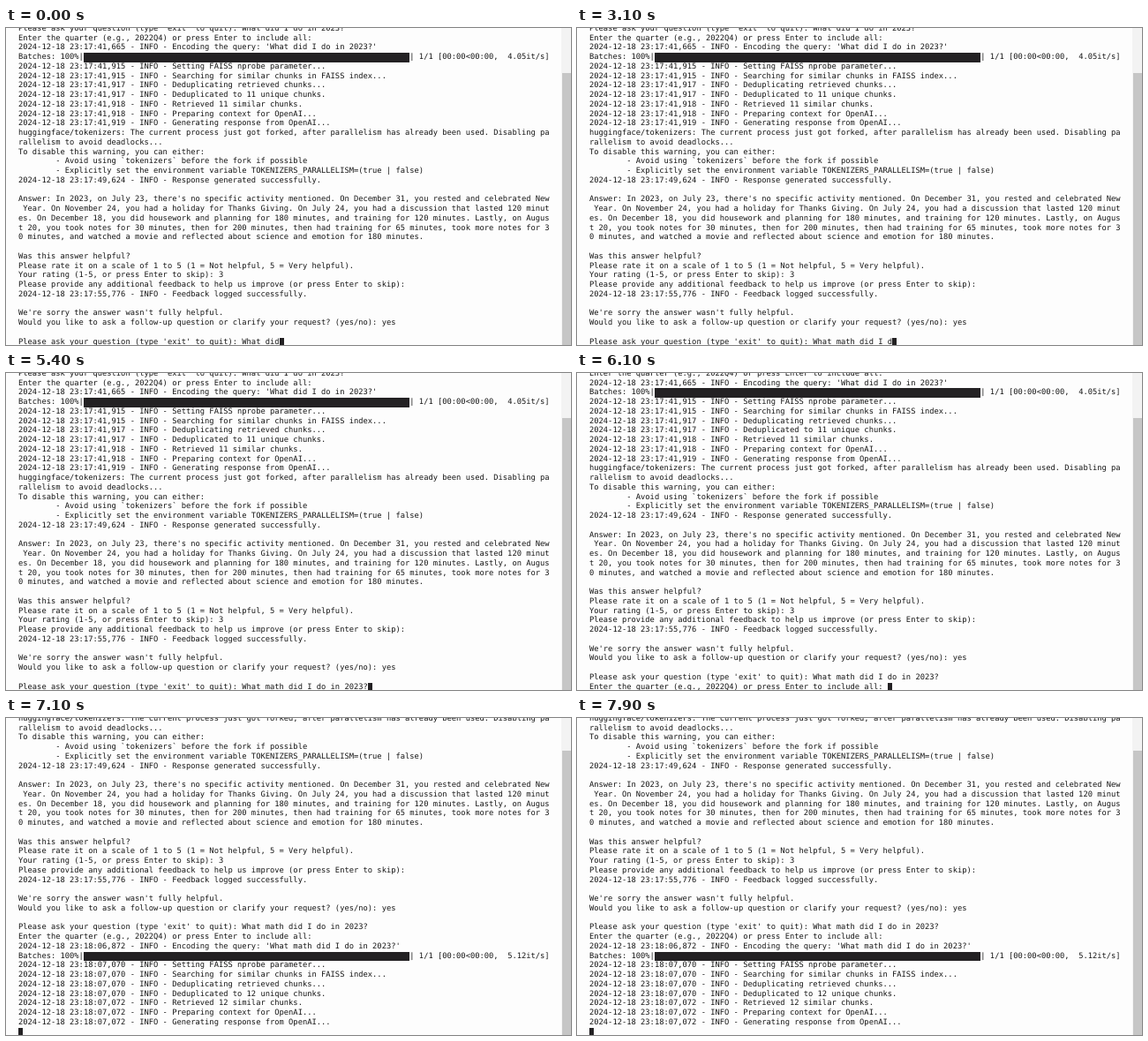
These frames come from a looping animation (640x359 px, 8 s). An HTML page:

```html
<!DOCTYPE html>
<html lang="en">
<head>
<meta charset="utf-8">
<title>Terminal session</title>
<style>
  html, body { margin: 0; width: 100%; height: 100%; overflow: hidden; background: #fdfdfd; }
  #term {
    position: absolute; left: 14px; top: -4.2px; margin: 0;
    font: 8.78px/10.75px "DejaVu Sans Mono", monospace;
    text-rendering: geometricPrecision; font-variant-ligatures: none;
    color: #161616; white-space: pre;
  }
  #term b, #term i {
    display: inline-block; height: 10.75px; vertical-align: top;
    background: #232123; color: #fdfdfd; font: inherit;
  }
  #track { position: absolute; left: 629px; top: 0; width: 11px; height: 359px; background: #f3f3f3; }
  #thumb { position: absolute; left: 1px; right: 0; bottom: 0; background: #c6c6c6; }
</style>
</head>
<body>
<pre id="term"></pre>
<div id="track"><div id="thumb"></div></div>
<script>
const LOOP = 8000, ROWS = 34;
const ASK = "Please ask your question (type 'exit' to quit): ";
const QUARTER = "Enter the quarter (e.g., 2022Q4) or press Enter to include all: ";
const QUESTION = "What math did I do in 2023?";

const cursor = (ch = " ") => `<i>${ch}</i>`;
const log = (time, msg) => `2024-12-18 23:${time} - INFO - ${msg}`;
const encoding = (time, query) => log(time, `Encoding the query: '${query}'`);
const doneBar = rate =>
  `Batches: 100%|<b>${" ".repeat(70)}</b>| 1/1 [00:00&lt;00:00,  ${rate}it/s]`;
const emptyBar = `Batches:   0%|${" ".repeat(78)}| 0/1 [00:00&lt;?, ?it/s${cursor("]")}`;

const search = (times, count) => [
  "Setting FAISS nprobe parameter...",
  "Searching for similar chunks in FAISS index...",
  "Deduplicating retrieved chunks...",
  `Deduplicated to ${count} unique chunks.`,
  `Retrieved ${count} similar chunks.`,
  "Preparing context for OpenAI...",
  "Generating response from OpenAI..."
].map((msg, i) => log(times[i], msg));

const early = ["17:41,915", "17:41,915", "17:41,917", "17:41,917", "17:41,918", "17:41,918", "17:41,919"];
const late = [..."0000222"].map(d => "18:07,07" + d);

const history = [
  ASK + "What did I do in 2023?",
  QUARTER,
  encoding("17:41,665", "What did I do in 2023?"),
  doneBar("4.05"),
  ...search(early, 11),
  "huggingface/tokenizers: The current process just got forked, after parallelism has already been used. Disabling pa",
  "rallelism to avoid deadlocks...",
  "To disable this warning, you can either:",
  "        - Avoid using `tokenizers` before the fork if possible",
  "        - Explicitly set the environment variable TOKENIZERS_PARALLELISM=(true | false)",
  log("17:49,624", "Response generated successfully."),
  "",
  "Answer: In 2023, on July 23, there's no specific activity mentioned. On December 31, you rested and celebrated New",
  " Year. On November 24, you had a holiday for Thanks Giving. On July 24, you had a discussion that lasted 120 minut",
  "es. On December 18, you did housework and planning for 180 minutes, and training for 120 minutes. Lastly, on Augus",
  "t 20, you took notes for 30 minutes, then for 200 minutes, then had training for 65 minutes, took more notes for 3",
  "0 minutes, and watched a movie and reflected about science and emotion for 180 minutes.",
  "",
  "Was this answer helpful?",
  "Please rate it on a scale of 1 to 5 (1 = Not helpful, 5 = Very helpful).",
  "Your rating (1-5, or press Enter to skip): 3",
  "Please provide any additional feedback to help us improve (or press Enter to skip):",
  log("17:55,776", "Feedback logged successfully."),
  "",
  "We're sorry the answer wasn't fully helpful.",
  "Would you like to ask a follow-up question or clarify your request? (yes/no): yes",
  ""
];

// First a draft is erased, then the question is typed: [start ms, letters].
const erased = [[0, 8], [100, 9], [800, 8], [1000, 7], [1100, 6], [1300, 5], [1600, 4]];
const typed = [
  [1800, 8], [2000, 9], [2100, 10], [2200, 11], [2300, 12], [2400, 13], [2600, 14],
  [2800, 16], [3100, 17], [3200, 18], [3300, 19], [3600, 20], [3800, 21], [3900, 22],
  [4300, 23], [4400, 24], [4500, 25], [4700, 26], [4800, 27], [4900, 26], [5400, 27]
];
const lettersAt = (keys, t) => keys.filter(k => k[0] <= t).pop()[1];

function input(t) {
  if (t < 1800) return "What did ".slice(0, lettersAt(erased, t));
  // A slash is hit by mistake before the question mark.
  if (t >= 4800 && t < 4900) return QUESTION.replace("?", "/");
  return QUESTION.slice(0, lettersAt(typed, t));
}

function session(t) {
  if (t < 5900) return [ASK + input(t) + cursor()];
  const asked = ASK + QUESTION;
  if (t < 6900) return [asked, QUARTER + cursor()];
  const query = [asked, QUARTER, encoding("18:06,872", QUESTION)];
  if (t < 7000) return [...query, emptyBar];
  return [...query, doneBar("5.12"), ...search(late, 12), cursor()];
}

const term = document.getElementById("term");
const thumb = document.getElementById("thumb");
let shown;

function draw(now) {
  const t = now % LOOP;
  const html = [...history, ...session(t)].slice(-ROWS).join("\n");
  if (html !== shown) term.innerHTML = shown = html;
  thumb.style.top = (t < 7000 ? 51 : 37) + "px";
}

const start = performance.now();
function tick() {
  draw(performance.now() - start);
  requestAnimationFrame(tick);
}
tick();
</script>
</body>
</html>
```
